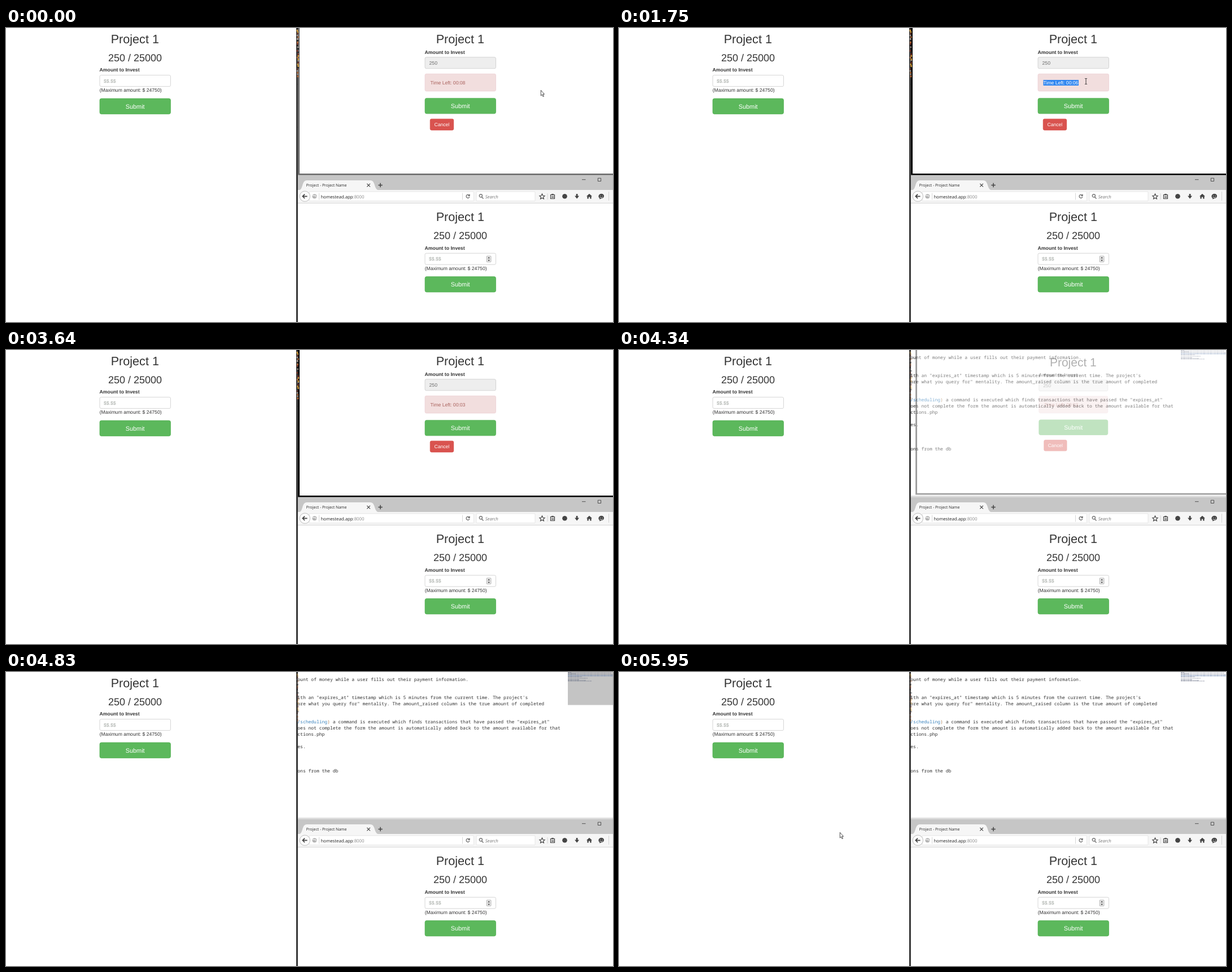
An HTML page for the animation above (8 s loop, 1075 by 521 pixels).

```html
<!DOCTYPE html>
<html lang="en">
<head>
<meta charset="utf-8">
<title>Project funding demo</title>
<style>
  html, body { margin: 0; width: 100%; height: 100%; overflow: hidden; background: #fff; }
  svg { display: block; width: 100%; height: 100%; }
  text { font-family: "Liberation Sans", Arial, sans-serif; font-size: 8.6px; fill: #333; text-rendering: geometricPrecision; white-space: pre; }
  .h1 { font-size: 21.6px; text-anchor: middle; }
  .h2 { font-size: 18px; text-anchor: middle; }
  .label { font-size: 8.7px; font-weight: bold; }
  .button { font-size: 10.9px; fill: #fff; text-anchor: middle; }
  .hint { fill: #a3a8a3; }
  .light { fill: #fff; }
  .timer { fill: #a9615c; }
  .code { font-family: "Noto Sans Mono", "Liberation Mono", monospace; font-size: 8px; }
  .ui { font-family: "Open Sans", "Noto Sans", sans-serif; font-size: 7.8px; fill: #222; }
  .tab { font-size: 6.9px; }
  .muted { fill: #888; }
  .search { font-style: italic; fill: #777; }
  .icon { fill: none; stroke: #444; stroke-width: 1.2; }
  .solid { fill: #444; }
</style>
</head>
<body>
<svg id="stage" viewBox="0 0 1075 521" xmlns="http://www.w3.org/2000/svg"></svg>
<script>
const LOOP = 8000, STEP = 70;

const text = (x, y, content, cls = '', extra = '') =>
  `<text x="${x}" y="${y}" class="${cls}" ${extra}>${content}</text>`;
const box = (x, y, w, h, fill, stroke = 'none', r = 0) =>
  `<rect x="${x}" y="${y}" width="${w}" height="${h}" rx="${r}" fill="${fill}" stroke="${stroke}" stroke-width=".7"/>`;
const path = (d, cls = 'icon', extra = '') => `<path d="${d}" class="${cls}" ${extra}/>`;

const submitButton = y =>
  box(166, y, 125.5, 27.4, '#5cb85c', '#4cae4c', 3) + text(228.7, y + 17.6, 'Submit', 'button');

const investForm = (dx, dy) => `<g transform="translate(${dx} ${dy})">
  ${text(228.3, 26.5, 'Project 1', 'h1')}
  ${text(228.5, 58.8, '250 / 25000', 'h2')}
  ${text(165.6, 77.4, 'Amount to Invest', 'label')}
  ${box(166, 83.6, 125.5, 20, '#fff', '#c4c4c4', 2.4)}
  ${text(173, 96.6, '$$.$$', 'hint')}
  ${text(165.7, 113, '(Maximum amount: $ 24750)')}
  ${submitButton(125)}</g>`;

const codeLines = [
  [0, 'ount of money while a user fills out their payment information.'],
  [3, 'ith an "expires_at" timestamp which is 5 minutes from the current time. The project\'s'],
  [4, 'ore what you query for" mentality. The amount_raised column is the true amount of completed'],
  [7, '<tspan fill="#3b83bd">/scheduling</tspan><tspan fill="#a5794f">)</tspan> a command is executed which finds transactions that have passed the "expires_at"'],
  [8, 'oes not complete the form the amount is automatically added back to the amount available for that'],
  [9, 'ctions.php'],
  [11, 'es.'],
  [15, 'ons from the db']
];
const miniLines = [[0.5, 6], [2, 77], [3.2, 14], [4.8, 80], [6, 80], [7.2, 80], [8.4, 25], [11, 35], [13.6, 20], [14.8, 32], [16, 42]];

const editor = box(517, 0, 558, 262, '#fff') +
  codeLines.map(([row, line]) => text(516.3, 15.8 + row * 10.8, line, 'code')).join('') +
  '<g id="hover">' + box(995, 0, 80, 58.5, '#c4c4c4') + '</g>' +
  miniLines.map(([y, w], i) => path(`M995 ${y}h${w}`, '',
    `stroke="${i > 3 && i < 6 ? '#6b86b4' : '#626a80'}" stroke-width=".8" stroke-dasharray="3 .6 5 .7 2 .5" opacity=".75"`)).join('');

const popup = `<g id="popup">
  ${box(518.5, -300, 800, 559.5, '#fff')}
  <path id="frame" d="M518.5 -300V259.5H1320" fill="none" stroke-width="3"/>
  ${text(804.3, 26.5, 'Project 1', 'h1')}
  ${text(741.6, 45.9, 'Amount to Invest', 'label')}
  ${box(742, 51.8, 125.5, 20, '#eee', '#c4c4c4', 2.4)}
  ${text(749.6, 64.9, '250', '', 'fill-opacity=".7"')}
  ${box(742, 81.3, 125.5, 30.6, '#f2dede', '#ebccd1', 2.4)}
  ${text(751.6, 99.9, '', 'timer count')}
  <clipPath id="picked"><rect id="pickedBox" x="751.5" y="92" height="10"/></clipPath>
  <g clip-path="url(#picked)">${box(751, 91, 65, 12, '#2f86f0')}${text(751.6, 99.9, '', 'light count')}</g>
  <g transform="translate(576 -.6)">${submitButton(125)}</g>
  ${box(751.2, 161.2, 41.5, 19.8, '#d9534f', '#d43f3a', 2.4)}
  ${text(758.5, 174, 'Cancel', 'light')}</g>`;

const toolbarIcons =
  path('M949.5 294l1.4 3 3.2.4-2.4 2.2.7 3.2-2.9-1.6-2.9 1.6.7-3.2-2.4-2.2 3.2-.4z') +
  path('M964.5 295.5h7v7h-7zM966 294.5h4M966 298h4.5M966 300.3h4.5') +
  '<circle cx="989.5" cy="298.3" r="4.3" fill="#444"/>' +
  path('M1009.7 294h2.8v3.6h2.6l-4 4.8-4-4.8h2.6z', 'solid') +
  path('M1033 293.8l5 4.5h-1.4v4.3h-2.4v-3h-2.4v3h-2.4v-4.3h-1.4z', 'solid') +
  path('M1054.3 293.8c6.4 0 6.4 8.2 0 8.2l-3 1.4v-1.8c-3.400-2-2-7.800 3-7.800z', 'solid') +
  path('M1052 297h1M1055.700 297h1M1051.700 299c1 2 4.300 2 5.300 0', 'icon', 'style="stroke:#fff;stroke-width:.9"');

const browser = `
  <linearGradient id="shade" x2="0" y2="1"><stop stop-color="#fff" stop-opacity="0"/><stop offset="1" stop-color="#bbb"/></linearGradient>
  <g id="shadow">${box(517, 256, 558, 4.5, 'url(#shade)')}</g>
  ${box(516, 260.8, 560, 261, '#fff')}
  ${box(516, 260.8, 560, 26.5, '#c6c6c6')}
  ${box(516, 287, 560, 23.3, '#f6f6f6')}
  ${path('M516 310.300H1075', '', 'stroke="#c8c8c8" stroke-width=".8"')}
  ${path('M519 287.300C527 286 523 270 533 270H645C655 270 651 286 660 287.300Z', '', 'fill="#f6f6f6"')}
  ${text(531.8, 281.2, 'Project - Project Name', 'ui tab')}
  ${path('M639.300 275.800l5.600 5.600m0-5.600l-5.600 5.600')}
  ${path('M659.300 278.500h7.400M663 274.800v7.400', 'icon', 'style="stroke-width:1.500"')}
  ${path('M1020 268.700h6.500M1048.300 266.200h5.300v5.300h-5.300z', 'icon', 'style="stroke-width:.9"')}
  ${box(537, 290, 291.5, 16.6, '#fff', '#ddd', 1)}
  ${box(833, 290, 104, 16.6, '#fff', '#ddd', 1)}
  <circle cx="529.3" cy="298.3" r="9.2" fill="#fcfcfc" stroke="#b5b5b5" stroke-width=".9"/>
  ${path('M533.500 298.300h-8M529 294.600l-3.700 3.700 3.700 3.700', 'icon', 'style="stroke-width:1.700"')}
  <circle cx="546.4" cy="298.3" r="4" fill="#b4b4b4"/>
  ${path('M543 297c2-2 2 2 4 0s1 3 2.500 2', 'icon', 'style="stroke:#eee"')}
  ${path('M554.500 292.500v12M808.500 292.500v12M959 293v11M1067.500 290v16', '', 'stroke="#ccc" stroke-width=".8"')}
  ${text(557.5, 301.5, 'homestead.app<tspan class="muted">:8000</tspan>', 'ui')}
  ${path('M820.600 296.700a3 3 0 1 0 .3 2.600M821 294.500v2.800h-2.800', 'icon', 'style="stroke:#666"')}
  ${path('M842.500 299.500l3 3M838.200 297.300a2.600 2.600 0 1 0 5.200 0a2.600 2.600 0 1 0-5.200 0', 'icon', 'style="stroke:#666"')}
  ${text(848.7, 301.5, 'Search', 'ui search')}
  ${toolbarIcons}
  ${investForm(576, 315.6)}
  ${box(851.3, 404.2, 7.6, 10.4, '#ececec', '#999', .6)}
  ${path('M853 408.300l2.100-2.600 2.100 2.600zM853 410.700l2.100 2.600 2.100-2.600z', 'solid')}`;

let seed = 11;
const random = () => (seed = seed * 16807 % 2147483647) / 2147483647;
const stripColors = ['#c5703a', '#2a2422', '#d9a13c', '#b9aaa0', '#7a2f22', '#151515'];
const strip = Array.from({ length: 29 }, (_, i) =>
  box(514.5 + random() * 2, i * 3, 2.6, 1.5 + random() * 2, stripColors[Math.floor(random() * 6)])).join('');

const divider = box(514, 0, 2.8, 521, '#2b2b2b') + `<g id="strip">${strip}</g>`;

const pointer = `<g id="pointer">
  <path id="arrow" d="M.3 .3V10L2.400 8L4 11.600L5.500 11L3.900 7.300H6.500Z" fill="#fff" stroke="#222" stroke-width=".8"/>
  <path id="beam" d="M-2-5h1.500l.5.5.5-.5H2M0-4.500V4.500M-2 5h1.500l.5-.5.5.5H2" fill="none" stroke="#222" stroke-width=".9"/></g>`;

const $ = id => document.getElementById(id);
$('stage').innerHTML = box(0, 0, 1075, 521, '#fff') + editor + popup + browser + divider + investForm(0, 0) + pointer;
const counters = document.querySelectorAll('.count');

// time, x, y
const pointerPath = [
  [0, 947, 110], [280, 947, 110], [420, 938, 114], [560, 891, 122], [700, 822, 113], [840, 772, 98],
  [910, 761.5, 96], [1120, 752, 96], [1260, 752, 96], [1470, 767, 96], [1610, 792, 95], [1750, 827, 94.5],
  [1890, 876, 92], [2030, 917, 108], [2100, 922, 114], [2170, 922, 114], [2240, 924, 114], [2730, 924, 114],
  [2870, 944, 98], [3010, 1005, 40], [3080, 1035, 7], [3150, 1050, -40], [4760, 1040, -40], [4830, 1035, -14],
  [4900, 1003, 40], [5110, 800, 195], [5320, 590, 300], [5460, 490, 316], [5600, 413, 287],
  [5670, 396, 284], [5740, 392, 284], [5880, 392, 284], [5950, 391, 284], [LOOP, 391, 284]
];

function pointerAt(t) {
  const next = pointerPath.findIndex(p => p[0] > t);
  const [t0, x0, y0] = pointerPath[next - 1], [t1, x1, y1] = pointerPath[next];
  const k = (t - t0) / (t1 - t0);
  return [x0 + (x1 - x0) * k, y0 + (y1 - y0) * k];
}

function draw(time) {
  const t = Math.floor(time % LOOP / STEP) * STEP;
  const open = t < 4340, closing = !open && t < 4480;
  const [x, y] = pointerAt(t);

  const dragging = t >= 1330 && t < 2100;
  const overText = open && x > 750 && x < 815 && y > 88 && y < 104;
  const overEditor = !open && x > 517 && x < 995 && y < 259;
  const beam = dragging || overText || overEditor;
  $('pointer').setAttribute('transform', `translate(${x} ${y})`);
  $('beam').style.display = beam ? '' : 'none';
  $('arrow').style.display = beam ? 'none' : '';

  const seconds = 8 - Math.max(0, Math.floor((t - 560) / 770) + 1);
  counters.forEach(c => c.textContent = `Time Left: 00:0${Math.max(0, seconds)}`);
  const pickedEnd = dragging ? Math.min(x, 814) : t >= 2100 && t < 2660 ? 792 : 0;
  $('pickedBox').setAttribute('width', Math.max(0, pickedEnd - 751.5));

  const scale = open ? 1 : t < 4410 ? .972 : .95;
  $('popup').style.opacity = open ? 1 : !closing ? 0 : t < 4410 ? .38 : .12;
  $('popup').setAttribute('transform', `translate(805 103) scale(${scale}) translate(-805 -103)`);
  $('frame').setAttribute('stroke', t < 70 ? '#6b6b6b' : t < 140 ? '#383838' : '#050505');
  $('strip').style.opacity = open ? .9 : .35;
  $('shadow').style.display = open ? 'none' : '';
  $('hover').style.display = t >= 4830 && t < 4970 ? '' : 'none';
}

const start = performance.now();
(function tick() {
  draw(performance.now() - start);
  requestAnimationFrame(tick);
})();
</script>
</body>
</html>
```
